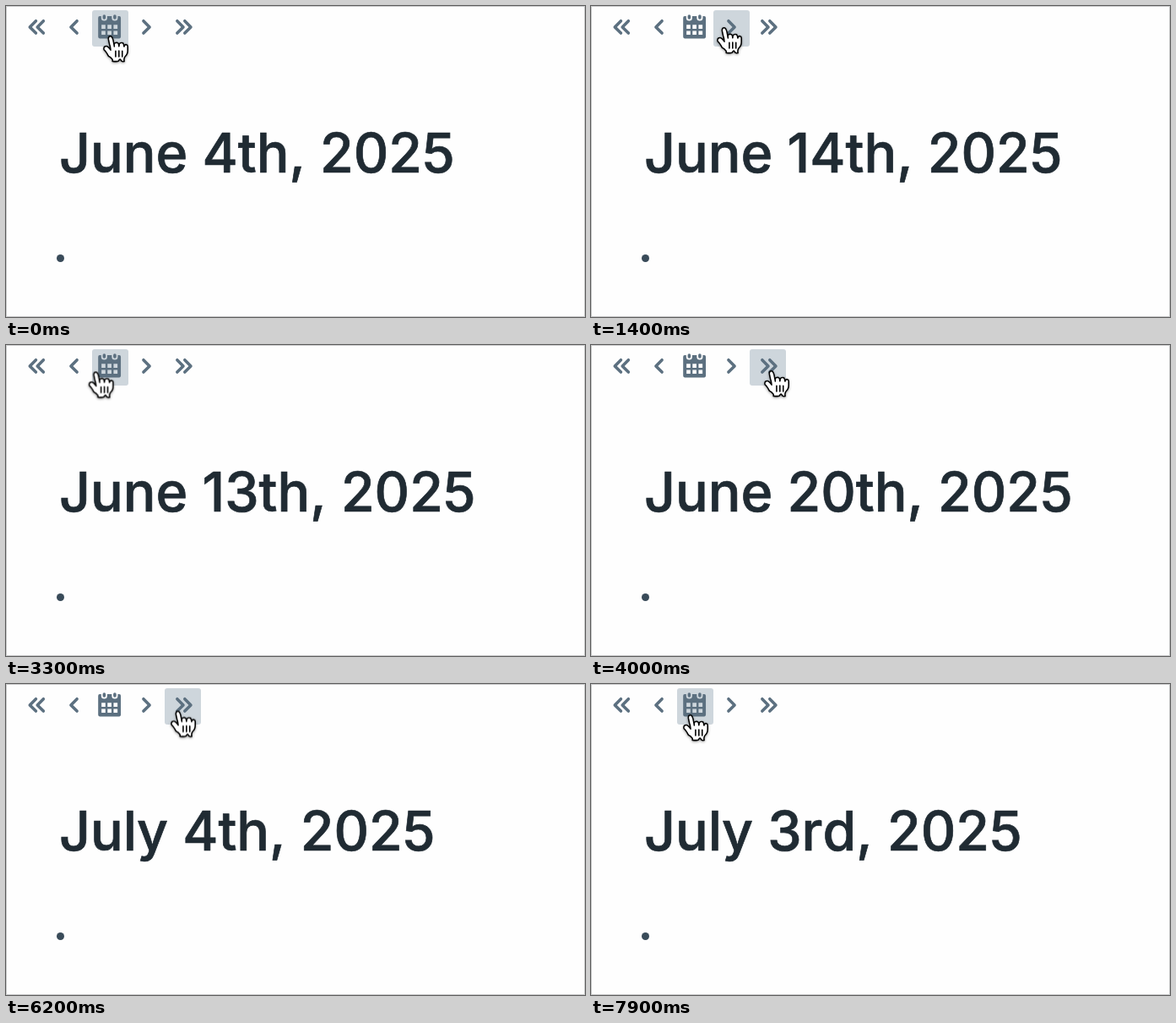
An HTML page for the animation above (8 s loop, 686 by 368 pixels).

```html
<!DOCTYPE html>
<html lang="en">
<head>
<meta charset="utf-8">
<title>Daily notes navigation</title>
<style>
  html, body { margin: 0; width: 100%; height: 100%; overflow: hidden; }
  body { position: relative; background: #fefefe; }

  .frame { position: absolute; inset: 0; border: 1px solid #c9cacb; }

  .hover, .dates, .hand { animation: 8s step-end -20ms infinite; }

  .hover {
    --idle: #ced6dc;
    --down: #bfc8cf;
    position: absolute; left: 102px; top: 5px;
    width: 43px; height: 43px;
    border-radius: 3px;
    animation-name: hover;
  }

  .icons { position: absolute; left: 0; top: 0; color: #5c7080; }

  .title {
    position: absolute; left: 63px; top: 129px;
    width: 600px; height: 90px;
    margin: 0; overflow: hidden;
    font: 500 64.4px/90px Inter, sans-serif;
    font-optical-sizing: none;
    font-kerning: none;
    -webkit-text-stroke: .7px #202b33;
    color: #202b33;
    white-space: nowrap;
  }
  .dates { display: block; animation-name: dates; }
  .dates span { display: block; height: 90px; }

  .bullet {
    position: absolute; left: 59.8px; top: 293.8px;
    width: 9.4px; height: 9.4px;
    border-radius: 50%;
    background: #394b59;
  }

  .hand {
    position: absolute; left: 0; top: 0;
    overflow: visible;
    filter: drop-shadow(0 1.5px 1.5px rgba(0, 0, 0, .4));
    animation-name: hand;
  }

  /* 1.25% is 100 ms */
  @keyframes dates {
    0%     { transform: translateY(0); }
    2.5%   { transform: translateY(-90px); }
    15%    { transform: translateY(-180px); }
    22.5%  { transform: translateY(-270px); }
    33.75% { transform: translateY(-360px); }
    38.75% { transform: translateY(-450px); }
    50%    { transform: translateY(-540px); }
    57.5%  { transform: translateY(-630px); }
    67.5%  { transform: translateY(-720px); }
    90%, 100% { transform: translateY(-810px); }
  }

  @keyframes hover {
    0%, 2.5%  { transform: none; background: var(--idle); }
    1.25%     { transform: none; background: var(--down); }
    10%, 15%, 22.5% { transform: translateX(43px); background: var(--idle); }
    13.75%, 21.25%  { transform: translateX(43px); background: var(--down); }
    25%       { transform: none; background: var(--idle); }
    30%, 33.75%, 38.75% { transform: translateX(-43px); background: var(--idle); }
    32.5%, 37.5%        { transform: translateX(-43px); background: var(--down); }
    41.25%    { transform: none; background: var(--idle); }
    45%       { transform: translateX(43px); background: var(--idle); }
    46.25%, 50%, 57.5%, 67.5% { transform: translateX(86px); background: var(--idle); }
    48.75%, 56.25%, 66.25%    { transform: translateX(86px); background: var(--down); }
    80%       { transform: translateX(43px); background: var(--idle); }
    82.5%     { transform: none; background: var(--idle); }
    86.25%, 90% { transform: translateX(-43px); background: var(--idle); }
    88.75%    { transform: translateX(-43px); background: var(--down); }
    96.25%, 100% { transform: none; background: var(--idle); }
  }

  @keyframes hand {
    0%     { transform: translate(114px, 34px); }
    6.25%  { transform: translate(114px, 34px); animation-timing-function: steps(4); }
    11.25% { transform: translate(148px, 24px); }
    23.75% { transform: translate(148px, 24px); animation-timing-function: steps(3); }
    27.5%  { transform: translate(113px, 33px); animation-timing-function: steps(3); }
    31.25% { transform: translate(79px, 28px); }
    40%    { transform: translate(79px, 28px); animation-timing-function: steps(3); }
    43.75% { transform: translate(132px, 35px); animation-timing-function: steps(3); }
    47.5%  { transform: translate(204px, 29px); }
    76.25% { transform: translate(204px, 29px); animation-timing-function: steps(2); }
    78.75% { transform: translate(184px, 32px); animation-timing-function: steps(3); }
    82.5%  { transform: translate(132px, 35px); }
    83.75% { transform: translate(114px, 34px); animation-timing-function: steps(2); }
    86.25% { transform: translate(79px, 28px); }
    92.5%  { transform: translate(79px, 28px); animation-timing-function: steps(5); }
    98.75%, 100% { transform: translate(108px, 35px); }
  }
</style>
</head>
<body>
  <div class="frame"></div>
  <div class="hover"></div>

  <svg class="icons" width="240" height="54" fill="none" stroke="currentColor"
       stroke-width="2" stroke-linecap="round" stroke-linejoin="round">
    <defs>
      <path id="chevron" d="M4 -4L0 0L4 4"/>
      <g id="double"><use href="#chevron" x="-5"/><use href="#chevron"/></g>
    </defs>
    <use href="#double" transform="translate(37.2 24.9) scale(1.79)"/>
    <use href="#chevron" transform="translate(80.5 24.9) scale(1.79) translate(-2)"/>
    <g transform="translate(109.2 10.3) scale(1.79)" fill="currentColor" stroke="none">
      <path fill-rule="evenodd" d="M14 1h-1v1a2 2 0 0 1-4 0V1H6v1a2 2 0 0 1-4 0V1H1a1 1 0 0 0-1 1v12.7a1 1 0 0 0 1 1h13a1 1 0 0 0 1-1V2a1 1 0 0 0-1-1z
        M2.2 6.7h2.6v2.6h-2.6zM6.2 6.7h2.6v2.6h-2.6zM10.2 6.7h2.6v2.6h-2.6z
        M2.2 10.7h2.6v2.6h-2.6zM6.2 10.7h2.6v2.6h-2.6zM10.2 10.7h2.6v2.6h-2.6z"/>
      <rect x="3" width="2" height="3" rx="1"/>
      <rect x="10" width="2" height="3" rx="1"/>
    </g>
    <use href="#chevron" transform="translate(166.5 24.9) scale(-1.79 1.79) translate(-2)"/>
    <use href="#double" transform="translate(210 24.9) scale(-1.79 1.79)"/>
  </svg>

  <h1 class="title">
    <span class="dates">
      <span>June 4th, 2025</span>
      <span>June 13th, 2025</span>
      <span>June 14th, 2025</span>
      <span>June 15th, 2025</span>
      <span>June 14th, 2025</span>
      <span>June 13th, 2025</span>
      <span>June 20th, 2025</span>
      <span>June 27th, 2025</span>
      <span>July 4th, 2025</span>
      <span>July 3rd, 2025</span>
    </span>
  </h1>

  <div class="bullet"></div>

  <svg class="hand" width="33" height="35">
    <g transform="translate(1 1) scale(1.96) translate(-8 -8)" stroke="#000" stroke-width=".8"
       stroke-linecap="round" stroke-linejoin="round">
      <path fill="#fff" d="m11.3 20.4c-.3-.4-.6-1.1-1.2-2-.3-.5-1.2-1.5-1.5-1.9-.2-.4-.2-.6-.1-1 .1-.6.7-1.1 1.4-1.1.5 0 1 .4 1.4.7.2.2.5.6.7.8.2.2.2.3.4.5.2.3.3.5.2.1-.1-.5-.2-1.3-.4-2.1-.1-.6-.2-.7-.3-1.1-.1-.5-.2-.8-.3-1.3-.1-.3-.2-1.1-.3-1.5-.1-.5-.1-1.4.3-1.8.3-.3.9-.4 1.3-.2.5.3.8 1 .9 1.3.2.5.4 1.2.5 2 .2 1 .5 2.5.5 2.8 0-.4-.1-1.1 0-1.5.1-.3.3-.7.7-.8.3-.1.6-.1.9-.1.3.1.6.3.8.5.4.6.4 1.9.4 1.8.1-.4.1-1.2.3-1.6.1-.2.5-.4.7-.5.3-.1.7-.1 1 0 .2 0 .6.3.7.5.2.3.3 1.3.4 1.7 0 .1.1-.4.3-.7.4-.6 1.8-.8 1.9.6v2.3c0 .4-.1 1.3-.2 1.7-.1.3-.4 1-.7 1.4 0 0-1.1 1.2-1.2 1.8-.1.6-.1.6-.1 1 0 .4.1.9.1.9s-.8.1-1.2 0c-.4-.1-.9-.8-1-1.1-.2-.3-.5-.3-.7 0-.2.4-.7 1.1-1.1 1.1-.7.1-2.1 0-3.1 0 0 0 .2-1-.2-1.4-.3-.3-.8-.8-1.1-1.1z"/>
      <path d="M15.6 17.3v3.4M17.6 17.2v3.5M19.6 17.3v3.4"/>
    </g>
  </svg>
</body>
</html>
```
